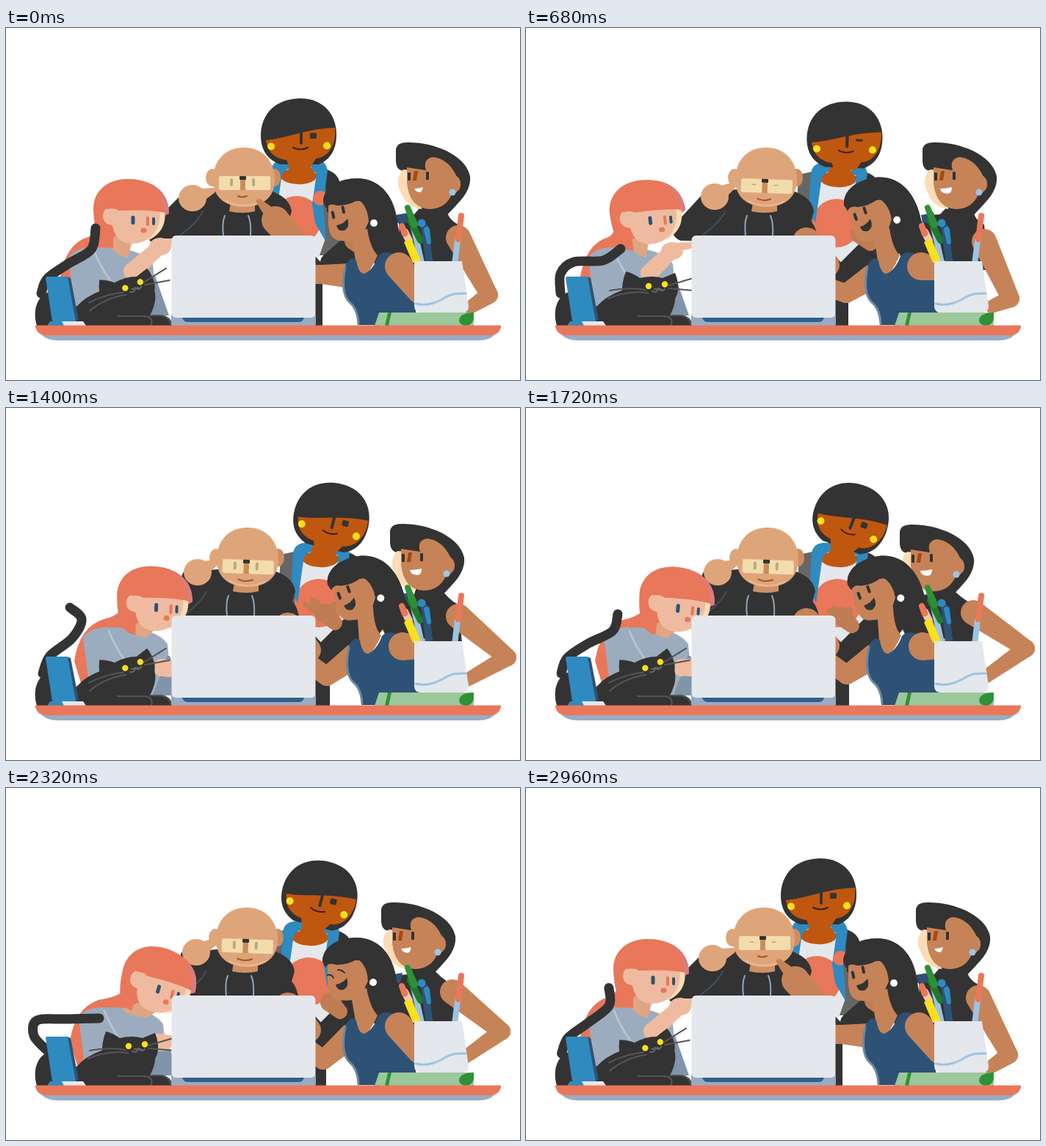
An HTML page with a canvas that plays this animation: 700x480 px, repeating every 3000 ms.

```html
<!DOCTYPE html>
<html>
<head>
<meta charset="utf-8">
<style>
html, body { margin: 0; width: 100%; height: 100%; overflow: hidden; background: #fff; }
canvas { display: block; }
</style>
</head>
<body>
<canvas id="stage" width="700" height="480"></canvas>
<script>
const g = document.getElementById('stage').getContext('2d');
const INK = '#333333', CORAL = '#e9775a', PALE = '#e4e7ec', STEEL = '#97acc3', BLUE = '#2f8abf',
  NAVY = '#2e5275', SKY = '#9cc3e2', ROSE = '#efbba0', TAN = '#dfa57a', BROWN = '#c68358',
  RUST = '#c0570f', YELLOW = '#fbe01c', GREY = '#666666', CREAM = '#fbdcb6';
const LOOP = 3000, HALF = LOOP / 2, FRAME = 40;
let now = 0;

// Monotone cubic through (ts, vs), repeating at the last time.
function curve(ts, vs, t) {
  const n = ts.length - 1;
  const slope = i => { i = (i + n) % n; return (vs[i + 1] - vs[i]) / (ts[i + 1] - ts[i]); };
  const tangent = i => {
    const a = slope(i - 1), b = slope(i);
    return a * b > 0 ? 2 * a * b / (a + b) : 0;
  };
  let i = 0;
  while (i < n - 1 && t >= ts[i + 1]) i++;
  const h = ts[i + 1] - ts[i], u = (t - ts[i]) / h, w = 1 - u;
  return vs[i] * (1 + 2 * u) * w * w + tangent(i) * h * u * w * w +
    vs[i + 1] * u * u * (3 - 2 * u) - tangent(i + 1) * h * u * u * w;
}

const POSES = [0, 680, 1000, 1400, 1720, 2320, 2800, LOOP];
const key = (...v) => curve(POSES, [...v, v[0], v[0]], now);
const between = (a, b) => now >= a && now < b;

function fill(color, path) {
  g.fillStyle = color;
  g.fill(new Path2D(path));
}
function line(color, width, path) {
  g.strokeStyle = color;
  g.lineWidth = width;
  g.lineCap = g.lineJoin = 'round';
  g.stroke(new Path2D(path));
}
function oval(color, x, y, rx, ry = rx) {
  g.fillStyle = color;
  g.beginPath();
  g.ellipse(x, y, rx, ry, 0, 0, 7);
  g.fill();
}
function box(color, x, y, w, h, r = 0) {
  g.fillStyle = color;
  g.beginPath();
  g.roundRect(x, y, w, h, r);
  g.fill();
}
// Tapered limb: the hull of two circles.
function limb(color, x1, y1, r1, x2, y2, r2) {
  const d = Math.max(Math.hypot(x2 - x1, y2 - y1), Math.abs(r1 - r2), .01);
  const a = Math.atan2(y2 - y1, x2 - x1), o = Math.acos((r1 - r2) / d);
  g.fillStyle = color;
  g.beginPath();
  g.arc(x1, y1, r1, a + o, a - o + 2 * Math.PI);
  g.arc(x2, y2, r2, a - o, a + o);
  g.fill();
}
function moved(dx, dy, draw, deg = 0, px = 0, py = 0) {
  g.save();
  g.translate(px + dx, py + dy);
  g.rotate(deg * Math.PI / 180);
  g.translate(-px, -py);
  draw();
  g.restore();
}

function standingWoman() {
  const bx = key(0, 27, 34, 30, 28, 16);
  fill(INK, `M405 330H${key(431, 439, 442, 441, 440, 436)}V406H405Z`);
  moved(bx, key(0, 4, 5, 4, 4, 2), () => {
    fill(GREY, 'M362 192L344 196L338 310H440L462 290L446 200Z');
    fill(INK, 'M434 192Q452 197 455 212L452 262L437 250Z');
    fill(PALE, 'M366 205H428L434 290L420 330H366Z');
    oval(CORAL, 396, 262, 33);
    fill(RUST, 'M385 165H415V190Q424 196 421 207Q411 214 397 213Q378 212 372 202L385 192Z');
    fill(BLUE, 'M361 194Q363 181 376 180L386 180Q390 189 383 193Q376 195 375 205L367 262L358 240Z');
    fill(BLUE, 'M413 178Q434 176 438 194L432 240L436 292L421 266L417 240L423 198Q413 192 413 178Z');
  });
  limb(INK, 492, 290, 24, key(442, 430, 430, 430, 430, 430), key(320, 338, 338, 338, 338, 338), 14);
  fill(INK, 'M418 308L434 325L450 345H418Z');

  const wink = between(560, 1200);
  moved(key(0, 35, 42.5, 41, 38.5, 24.5), key(0, 4.5, 6, 5.5, 5.5, 2.5), () => {
    fill(INK, 'M347 149C346 115 370 96 401 96C433 96 450 119 450 145C450 170 438 181 426 186H373C358 180 348 169 347 149Z');
    fill(RUST, 'M354 153C385 150 405 138 448 136C450 157 441 176 422 178L416 188H385L382 180C365 178 356 168 354 153Z');
    line(INK, 4, 'M402 143V157');
    if (wink) line(INK, 3, 'M415 148H422');
    else box(INK, 414, 143, 9, 8, 2);
    line('#3b2218', 2, 'M391 163Q401 168 411 163');
    oval(YELLOW, 361, 161.5, 5);
    oval(YELLOW, 437, 160.5, 5);
  }, key(0, 2, 4, 13.5, 20, 15), 399, 160.5);
}

function baldMan() {
  const dx = key(0, 3, 5, 5, 5, 4);
  const ex = key(206, 214, 222, 250, 250, 248), ey = key(280, 276, 270, 262, 262, 260);
  const hx = key(254, 257, 260, 261, 261, 259), hy = key(232, 230, 224, 224, 224, 224);
  limb(INK, 288, 256, 36, ex, ey, 14);
  limb(INK, ex, ey, 14, hx - 8, hy + 8, 14);
  moved(dx, 0, () => {
    fill(INK, 'M222 290Q262 226 300 218H345Q386 226 389 250Q386 260 385 264Q392 270 395 290Z');
    line('#3f4e59', 2, 'M268 250Q262 264 238 282');
    fill('#cf9064', 'M306 238H339V250Q322 254 304 250Z');
    line('#8fa5bd', 2, 'M298 256Q294 265 296 284M330 256Q334 265 333 284');
    oval(TAN, 281, 204, 9, 12);
    oval('#cf8e60', 366, 204, 8, 12);
    fill(TAN, 'M282 207C282 180 299 163 324 163C349 163 366 181 366 207C366 231 349 244 324 244C299 244 282 231 282 207Z');
    line('#e9b893', 2, 'M300 236Q322 248 348 237');
  });
  moved(key(0, 3, 5, 5, 5, 4), key(0, 4, 5, 5, 5, 4), () => {
    box('#f3dcac', 290, 202, 29, 19, 2);
    box('#f3dcac', 326, 202, 34, 19, 2);
    box('#c98d5c', 319, 207, 7, 14);
    box(INK, 318, 202, 9, 5, 1);
    if (between(620, 760) || between(2880, LOOP)) {
      line('#b9aa82', 1.5, 'M305 210H310M335 210H340');
    } else {
      box('#b9aa82', 305, 205, 4, 11, 2);
      box('#b9aa82', 335, 205, 4, 11, 2);
    }
    const w = key(6, 9, 10, 10, 10, 10);
    line('#a8541f', 2, `M${322 - w} 229Q322 ${230 + w / 3} ${322 + w} 229`);
  }, key(0, 2, 2, 2, 2, 2), 324, 205);
  limb(TAN, hx, hy, 12, key(281, 283, 286, 287, 287, 285), key(222, 214, 209, 209, 209, 209), 4);
  oval(TAN, hx, hy, 19, 18);
  const rx = key(367, 382, 384, 384, 382, 384), ry = key(262, 291, 298, 298, 292, 298);
  limb(BROWN, rx + 28, ry + 32, 17, rx, ry, 19);
  limb(BROWN, rx - 4, ry - 6, 9, key(345, 372, 372, 372, 372, 372), key(237, 287, 287, 287, 287, 287), 4);
}

function redhead() {
  const bx = key(0, 0, 4, 20, 21, 14);
  const hx = key(0, -5, 1, 32, 35, 38), hy = key(0, 1, 2, 10, 11, 12);
  // Ponytail links the head to the back.
  fill(CORAL, `M${126 + hx} ${250 + hy}Q${132 + hx} ${276 + hy / 2} ${112 + bx} ${285 + hy / 3}Q${80 + bx} ${294 + hy / 2} ${73 + bx} 345L${86 + bx} 388H${110 + bx}L${146 + hx} ${300 + hy / 3}V${270 + hy}Z`);
  moved(bx, 0, () => {
    fill('#9cacbf', 'M85 313Q95 299 118 299L150 300Q188 304 200 322L206 392H95Z');
    fill('#8094aa', 'M199 338Q202 370 209 392H222L203 338ZM199 340L180 392H210Z');
    line('#b5c3d2', 3, 'M120 304Q128 325 142 344');
  });
  fill('#e0a583', `M${145 + hx} ${280 + hy}L${172 + hx} ${290 + hy}L${166 + (bx + hx) / 2} 313Q${152 + bx} 311 ${144 + bx} 301Z`);
  const ax = key(210, 199, 204, 222, 222, 212), ay = key(298, 304, 302, 355, 354, 347);
  limb(ROSE, key(172, 168, 172, 212, 212, 206), key(332, 334, 332, 354, 354, 347), 12, ax, ay, 10);
  oval(ROSE, ax, ay, 15, 12);
  limb(ROSE, ax, ay - 5, 6, 230, key(291, 296, 293, 350, 350, 342), 4);
  moved(hx, hy, () => {
    fill(CORAL, 'M119 247C119 222 138 206 165 206C198 206 222 222 222 253L205 262L146 285V300C126 300 120 275 119 247Z');
    fill(CREAM, 'M170 250L216 250C219 270 208 283 193 290Z');
    fill(ROSE, 'M138 246H209C213 272 198 294 172 294C155 294 147 283 145 269C128 268 130 248 138 246Z');
    box(NAVY, 170.5, 256, 5, 12, 2);
    box(NAVY, 199, 258, 4, 11, 2);
    box(CORAL, 191, 257, 4, 13, 2);
    oval(CORAL, 187.5, 276, 4, 3.5);
    fill(CORAL, 'M126 235Q140 206 165 206C198 206 222 222 222 253Q200 247 153 249Q149 245 138 247Z');
    fill('#d97c84', 'M192 212Q222 224 222 253L215 251Q217 227 192 212Z');
  }, key(0, -6, -3, 2, 5, 16), 170, 250);
}

function shortHairedMan() {
  const bx = key(0, 8, 7, 0, -7, -8);
  const hx = key(0, 9, 9, -8, -22, -20), hy = key(0, 0, 1, 2, 3, 0);
  fill(INK, `M${568 + hx} 240L${600 + hx} 244Q${600 + bx} 260 ${616 + bx} 268L${622 + bx} 330H540L${534 + bx} 256L${556 + bx} 254Z`);
  fill(NAVY, `M${530 + bx} 255L${548 + bx} 252L${545 + bx} 266H${532 + bx}Z`);
  const ex = key(658, 660, 674, 683, 681, 675), ey = key(364, 369, 359, 340, 328, 332);
  limb(BROWN, 616 + bx, key(286, 291, 290, 284, 279, 278), 17, ex, ey, 12);
  limb(BROWN, ex, ey, 12, key(632, 634, 630, 626, 624, 624), key(381, 380, 376, 372, 368, 368), 9);
  moved(hx, hy, () => {
    fill(INK, 'M531 166Q532 156 546 156C580 155 626 172 632 202C634 224 616 238 601 255L575 250L548 194Q532 198 531 182Z');
    fill(CREAM, 'M541 193Q529 206 537 222Q544 244 566 247L570 195Z');
    fill(BROWN, 'M546 190L572 194Q567 179 581 176Q602 178 613 201Q622 208 618 219Q613 226 607 227Q599 246 577 247Q550 246 546 212Z');
    box(INK, 547, 197, 4, 11, 1);
    box(INK, 572, 196, 4, 11, 1);
    fill('#a8490c', 'M556 195L561 195L559 208H554Z');
    const w = key(5.5, 8, 8, 8, 8, 6.5), mx = 562 + key(0, 1, 1, 4, 5, 3);
    fill('#fff', `M${mx - w} 219Q${mx} 219 ${mx + w} 217Q${mx + w} ${219 + w} ${mx} ${220 + w * .7}Q${mx - w + 1} ${220 + w * .6} ${mx - w} 219Z`);
    oval('#a0c4e6', 608, 224, 4.5);
  });
}

function longHairedWoman() {
  const bx = key(0, 3, 5, 5, 5, 0);
  const hx = key(0, 3, 8, 8, 8, -1), hy = key(0, -1, -3, -3, -3, -1);
  const head = draw => moved(hx, hy, draw, key(0, -7, -8, -8, -8, 0), 475, 255);
  oval(CORAL, key(428, 465, 465, 465, 465, 455), key(232, 226, 226, 226, 226, 228), 10);
  const px = key(474, 455, 448, 434, 430, 441), py = key(290, 281, 268, 280, 284, 292);
  const spread = key(0, 0, 0, 1, .6, .1);
  const palm = '#c07c52';
  limb(palm, px + 14, py + 13, 10, px, py, 13);
  for (const [x, y] of [[-26, -12], [-16, -18], [18, -14]]) {
    limb(palm, px, py, 8, px + x * spread, py + y * spread, 4);
  }
  const ex = key(430, 436, 437, 437, 437, 432), ey = key(336, 362, 366, 366, 364, 371);
  limb(BROWN, 470 + bx, 338, 17, ex, ey, 13);
  limb(BROWN, ex, ey, 13, key(408, 412, 412, 412, 412, 412), key(336, 354, 348, 348, 346, 356), 13);

  head(() => {
    fill(INK, 'M432 238C432 216 455 205 479 205C512 206 529 232 533 264Q535 285 545 291L556 322H502L490 285L478 245Z');
  });
  moved(bx, 0, () => {
    fill(BROWN, `M${470 + hx - bx} ${278 + hy}L${492 + hx - bx} ${274 + hy}Q496 300 506 310Q494 337 486 337Q476 336 476 318Z`);
    fill(NAVY, 'M462 324Q470 309 477 317Q480 335 488 335Q500 330 507 311Q514 303 527 308L558 345V405H481Q481 385 469 376Q455 363 462 324Z');
    line('#6c87a0', 3, 'M462 326Q455 362 468 374Q479 383 480 404');
    limb(BROWN, 535, 325, 19, 562, key(362, 330, 328, 328, 328, 362), 14);
  });
  head(() => {
    fill(BROWN, 'M439 236H482Q496 244 494 264L483 288Q470 292 455 290Q439 288 439 265Z');
    fill(INK, 'M432 238C432 216 455 205 479 205C512 206 529 232 533 264L494 268Q494 244 480 234Q465 243 450 242Q440 238 436 246Z');
    if (between(2200, 2440)) {
      line(INK, 2, 'M439 256Q445 255 447 260M453 249Q459 249 462 253');
    } else {
      moved(0, 0, () => {
        box(INK, 443, 248, 4, 11, 2);
        box(INK, 458, 244, 4, 11, 2);
      }, -12, 452, 252);
    }
    line(CORAL, 2, 'M441 269L447 270');
    fill(INK, 'M450 269Q459 268 465 260Q469 271 461 276Q452 278 450 269Z');
    oval('#fff', 501, 266, 5);
  });
}

const TAIL_TIMES = [0, 220, 680, 820, 1000, 1120, 1260, 1400, HALF];
// Base-to-tip points, one row per time.
const TAIL = [
  [48, 362, 56, 342, 84, 322, 116, 302, 122, 273],
  [48, 362, 56, 341, 85, 321, 118, 304, 125, 281],
  [47, 362, 47, 335, 65, 319, 105, 317, 129, 301],
  [56, 358, 38, 338, 42, 317, 80, 315, 127, 314],
  [70, 350, 58, 334, 24, 340, 20, 317, 50, 306],
  [66, 354, 50, 338, 30, 346, 14, 342, 8, 324],
  [56, 360, 48, 338, 46, 318, 34, 304, 34, 286],
  [50, 362, 60, 338, 90, 314, 103, 288, 87, 272]
];

function tail() {
  const p = TAIL[0].map((_, c) =>
    curve(TAIL_TIMES, [...TAIL, TAIL[0]].map(row => row[c]), now % HALF));
  const at = (i, c) => p[2 * Math.max(0, Math.min(4, i)) + c];
  let d = `M${p[0]} ${p[1]}`;
  for (let i = 0; i < 4; i++) {
    const near = c => at(i, c) + (at(i + 1, c) - at(i - 1, c)) / 6;
    const far = c => at(i + 1, c) - (at(i + 2, c) - at(i, c)) / 6;
    d += `C${near(0)} ${near(1)} ${far(0)} ${far(1)} ${at(i + 1, 0)} ${at(i + 1, 1)}`;
  }
  line(INK, 13, d);
}

function cat() {
  tail();
  fill(INK, 'M42 406C36 385 42 366 58 360L96 380Q108 366 130 358L200 352C207 366 202 380 196 392H214Q226 394 226 406Z');
  line('#555', 2, 'M152 393H188Q201 394 198 405M196 392H212Q223 394 224 404');
  const up = 1 - curve([0, 260, 600, 1050, 1350, HALF], [0, 0, 1, 1, 0, 0], now % HALF);
  moved(-1.5 * up, 0, () => {
    fill(INK, 'M136 332Q145 334 155 341Q172 337 186 341L203 334Q208 346 207 358Q204 378 178 382Q144 384 131 364Q130 347 136 332Z');
    line('#555', 2, 'M194 351L228 341M194 355L228 358M163 357Q140 353 114 358M166 361Q136 358 112 369');
    line('#666', 2, 'M172 359Q179 362 180 355Q184 361 189 356M175 356H184');
    oval(YELLOW, 167, 352, 4.2);
    oval(YELLOW, 189, 349.5, 4.2);
  }, -15.5 * up, 175, 365);
}

function desk() {
  // Phone on its stand
  fill(NAVY, 'M83 339L88 341L99 398L94 401Z');
  fill(BLUE, 'M54 341Q54 339 57 339H84L95 400H63Z');
  fill(BLUE, 'M56 406L60 400H80V406Z');
  fill(PALE, 'M76 400H105L109 406H79Z');
  // Laptop
  box(STEEL, 225, 390, 197, 16, 2);
  fill('#30608a', 'M240 394H406Q405 401 399 401H247Q241 401 240 394Z');
  box(PALE, 225.5, 283, 196, 112, 6);
  // Book
  fill('#9bc89b', 'M508 388H637V406H502Z');
  fill('#2f9137', 'M520 388H525L521 406H516ZM637 388Q617 388 617 400Q619 406 628 406Q635 404 637 397Z');
  // Pens
  limb(SKY, 555, 272, 4, 566, 320, 4);
  limb('#1f7a2a', 551, 262, 5, 564, 290, 4);
  limb('#2f9137', 547, 245, 4, 556, 268, 5);
  limb(NAVY, 570, 272, 5, 577, 322, 5);
  limb(BLUE, 573, 275, 4, 576, 292, 3);
  oval(BLUE, 566, 266, 5.5);
  limb('#f4c7a8', 543, 278, 5, 549, 290, 5);
  limb(CORAL, 539, 270, 4, 543, 280, 4.5);
  fill(YELLOW, 'M542 292L552 287L566 320H554Z');
  limb(SKY, 615, 290, 4, 611, 322, 4);
  limb(CORAL, 620, 256, 4, 616, 288, 4);
  // Cup
  fill(PALE, 'M556 318H621L630 379Q630 388 622 388H565Q556 388 556 379Z');
  line(SKY, 3, 'M558 376C576 380 589 373 599 367S617 362 626 362');
  // Table top
  fill(STEEL, 'M48 418H666Q658 426 644 426H70Q56 426 48 418Z');
  fill(CORAL, 'M40 405.5H674V408Q671 419 660 419H54Q43 419 40 408Z');
}

function draw() {
  now = Math.floor(performance.now() % LOOP / FRAME) * FRAME;
  g.fillStyle = '#fff';
  g.fillRect(0, 0, 700, 480);
  standingWoman();
  baldMan();
  redhead();
  shortHairedMan();
  longHairedWoman();
  cat();
  desk();
  requestAnimationFrame(draw);
}
draw();
</script>
</body>
</html>
```
